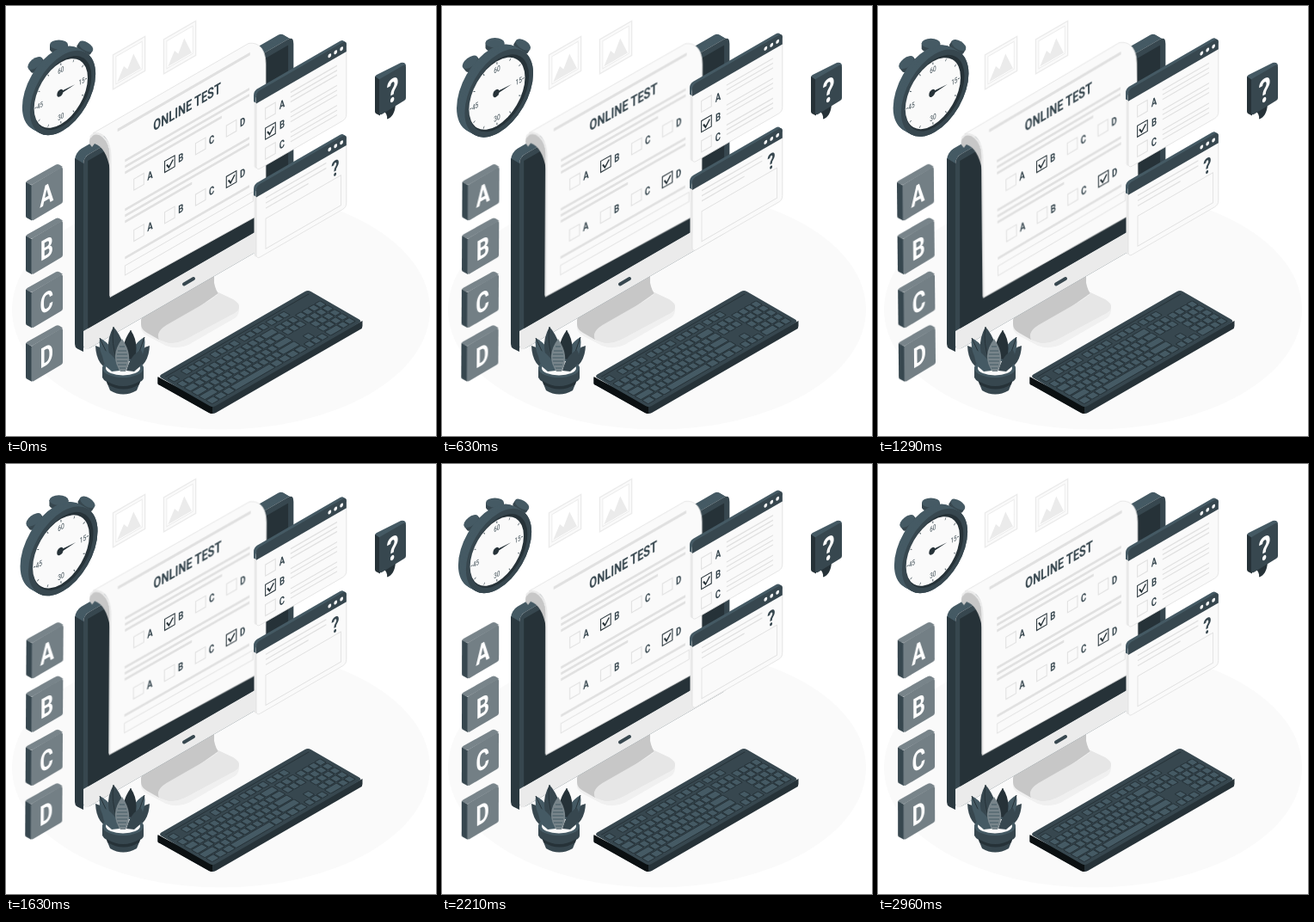
Recreate the animation shown at these times as an HTML page. Size 500x500 px, loop 3 s.

```html
<!DOCTYPE html>
<html lang="en">
<head>
<meta charset="utf-8">
<title>Online test</title>
<style>
html, body { margin: 0; width: 100%; height: 100%; overflow: hidden; background: #fff; }
svg { display: block; width: 100vw; height: 100vh; }
text { font-family: Roboto, Inter, "Liberation Sans", sans-serif; font-weight: 500; text-anchor: middle; fill: #37474f; }
.bold { font-weight: 700; }
.wind { animation: wind 1.5s linear infinite; }
#paper { transform-origin: 199.5px 190px; }
#blocks { transform-origin: 44.5px 310.5px; }
#watch { transform-origin: 61px 95px; animation: beat 3s linear infinite; }
.float { animation: float 1.5s linear infinite; }
@keyframes wind { 25% { transform: rotate(1deg); } 75% { transform: rotate(-1deg); } }
@keyframes float { 50% { transform: translateY(-10px); } }
@keyframes beat {
  0%, 30%, 40%, 60%, 100% { transform: scale(1); }
  10%, 50% { transform: scale(1.1); }
}
</style>
</head>
<body>
<svg viewBox="0 0 500 500">
  <defs>
    <g id="knob">
      <path d="M-5 4V14H5V4Z" fill="#263238"/>
      <path d="M-10.5 0V6C-8 12 8 12 10.5 6V0Z" fill="#37474f"/>
      <ellipse rx="10.5" ry="5.5" fill="#455a64"/>
    </g>
  </defs>
  <ellipse cx="250" cy="353" rx="243" ry="139.5" fill="#fafafa"/>
  <g id="pictures"></g>

  <g id="stand">
    <path d="M157 365V375Q158 380 165 384L186 395Q199 400 212 394L266 363Q272 359 271 349L240 335Z" fill="#f0f0f0"/>
    <path d="M157 366Q157 361 163 358L242 313V322Q244 331 247 334L190 374L178 388L164 380Q157 376 157 370Z" fill="#c7c7c7"/>
    <path d="M178 388Q173 378 190 369L232 345Q245 338 247 333L264 341Q272 346 271 350Q271 354 266 357L210 387Q196 394 186 391Z" fill="#e6e6e6"/>
  </g>
  <g id="monitor"></g>
  <path d="M207 323.500L218 317" stroke="#37474f" stroke-width="4" stroke-linecap="round"/>

  <g id="paper" class="wind">
    <path d="M97 160C96 144 116 140 121 172V190C118 173 112 163 103 160L100 164Z" fill="#c7c7c7"/>
    <path d="M121 338.500V172C121 155 113 146 101 148L282 43.500C294 41.500 302 50.500 302 67.500V238.500Z" fill="#fafafa" stroke="#e0e0e0" stroke-width=".8"/>
    <path d="M98 153C101 147 108 147 113 152Q121 159 121.500 174V337" fill="none" stroke="#ebebeb" stroke-width="2.200"/>
    <g id="sheet"></g>
  </g>
  <g id="windows" class="float"></g>

  <g id="plant">
    <path d="M124 424Q105 420 104 395Q118 399 129 418Z" fill="#37474f"/>
    <path d="M148 424Q166 418 167 395Q152 399 143 418Z" fill="#37474f"/>
    <path d="M126 424Q106 408 109 386Q125 394 132 418Z" fill="#455a64"/>
    <path d="M145 424Q164 408 161 385Q146 393 140 418Z" fill="#455a64"/>
    <path d="M129 424Q111 398 125 373Q140 390 139 418Z" fill="#37474f"/>
    <path d="M137 420Q132 394 145 377Q158 396 145 423Z" fill="#263238"/>
    <path d="M125 373Q122 392 129 412M145 377Q147 398 142 414M109 386Q116 402 125 418M161 385Q156 402 148 417" fill="none" stroke="#263238"/>
    <path d="M112 420V432Q114 436 117 437L121 447Q136 456 152 447L156 437Q160 435 160 432V420Z" fill="#37474f"/>
    <path d="M117 436Q136 448 156 436L155 440Q137 451 118 440Z" fill="#263238"/>
    <ellipse cx="136" cy="421" rx="24" ry="11" fill="#455a64"/>
    <ellipse cx="136" cy="421" rx="20" ry="8.500" fill="#fafafa"/>
    <path d="M116 419Q110 408 114 400Q128 406 132 424L123 425Z" fill="#455a64"/>
    <path d="M156 419Q162 408 157 400Q145 405 140 424L149 425Z" fill="#37474f"/>
    <path d="M133 425Q120 407 135 387Q149 407 139 425Z" fill="#78858b"/>
    <path d="M130 401H140M129 405H141M128.500 409H141.500M129 413H141M130 417H140M132 421H139M132 396H138" stroke="#455a64"/>
  </g>
  <g id="keyboard"></g>
  <g id="bubble">
    <path d="M439 122Q444 126 443 131.500Q452 129 453 114Z" fill="#263238"/>
    <path d="M429 83Q429 81 431 80L459 66Q465 65 465 70L435 87V127L430 124Q429 123 429 121Z" fill="#455a64"/>
    <path d="M429 82L435 86V127.500L430 125Q429 124 429 122Z" fill="#263238"/>
    <path d="M434 87Q434 85 436 84L462 69Q465 68 465 71V107Q465 109 463 110L437 126Q434 127 434 124Z" fill="#37474f"/>
  </g>
  <g id="watch"></g>
  <g id="blocks" class="wind"></g>
</svg>
<script>
const put = (id, s) => document.getElementById(id).insertAdjacentHTML('beforeend', s);
const iso = (x, y, s) => `<g transform="matrix(.866 -.5 0 1 ${x} ${y})">${s}</g>`;
const rect = (x, y, w, h, attrs) => `<rect x="${x}" y="${y}" width="${w}" height="${h}" ${attrs}/>`;
const line = (x1, x2, y, w) => `<path d="M${x1} ${y}H${x2}" stroke="#e0e0e0" stroke-width="${w}"/>`;
// Condensed label, centred on x and y.
const label = (s, x, y, size, attrs = 'class="bold"') =>
  `<text transform="translate(${x} ${y + size * .355}) scale(.86 1)" font-size="${size}" ${attrs}>${s}</text>`;
const box = (x, y, on) =>
  rect(x - 6.7, y - 6.5, 13.4, 13, `fill="none" stroke="${on ? '#263238' : '#e0e0e0'}" stroke-width="1.2"`) +
  (on ? `<path d="M${x - 4} ${y - 1}L${x - 1} ${y + 3.5}L${x + 4.5} ${y - 3}" fill="none" stroke="#263238" stroke-width="1.9"/>` : '');
// Stack copies from back to front to give a shape depth.
const extrude = (x, y, depth, s) => {
  let out = '';
  for (let d = depth; d >= 0; d--) out += iso(x - d, y - d * .577, s);
  return out;
};

for (const [x, y] of [[124, 97.5], [183, 79.5]]) {
  put('pictures', iso(x, y,
    rect(.5, -40.5, 43, 40, 'fill="#fafafa" stroke="#ebebeb" stroke-width="1.5"') +
    rect(4.5, -36.5, 35, 32, 'fill="#fff" stroke="#ebebeb"') +
    '<path d="M6 -6L15 -20L20 -14L28 -28L38 -6Z" fill="#ebebeb"/>'));
}

put('monitor',
  extrude(90, 402, 10, rect(0, -226, 282, 226, 'rx="9" fill="#455a64"')) +
  '<path d="M80 177L90 183V402L83 398.500Q80 397 80 392Z" fill="#2b3940"/>' +
  iso(90, 402,
    rect(0, -226, 282, 226, 'rx="7" fill="#ebebeb"') +
    '<path d="M0 -24V-218Q0 -226 8 -226H274Q282 -226 282 -218V-24Z" fill="#37474f"/>' +
    rect(6, -219, 269, 195, 'fill="#263238"')));

const answers = (y, checked) => [...'ABCD'].map((c, i) => {
  const x = 38.7 + i * 41.4;
  return box(x, y, c === checked) + label(c, x + 15, y, 12.8);
}).join('');
put('sheet', iso(121, 337,
  line(10, 188, -187.5, 3.5) +
  label('ONLINE TEST', 103.5, -168.2, 17.2) +
  line(20, 187, -147, 3) + line(20, 187, -140, 3) + line(20, 150, -133, 3) +
  answers(-113.3, 'B') +
  line(20, 187, -90, 3) + line(20, 187, -83, 3) + line(20, 110, -76, 3) +
  answers(-54, 'D') +
  line(20, 187, -34, 3) +
  rect(20, -25, 172, 11, 'fill="none" stroke="#e0e0e0"')));

const header = fill => `<path d="M0 13V5Q0 0 5 0H116Q121 0 121 5V13Z" fill="${fill}"/>`;
const panel = (y, h, inner) =>
  iso(288.5, y - 1, rect(0, 3, 121, h - 3, 'rx="5" fill="#ebebeb"')) +
  extrude(291, y, 3, header('#455a64')) +
  iso(291, y,
    rect(0, 3, 121, h - 3, 'rx="5" fill="#fafafa" stroke="#e0e0e0" stroke-width=".8"') +
    header('#37474f') +
    [98.5, 106.5, 114.5].map(x => `<circle cx="${x}" cy="6.5" r="2.2" fill="#fafafa"/>`).join('') + inner);
const options = [...'ABC'].map((c, i) => {
  const y = 31 + i * 23.2;
  return box(19, y, c === 'B') + label(c, 34.6, y, 12.8) +
    [-8, -2.5, 3].map(d => line(46, 108.5, y + d, 1.3)).join('');
}).join('');
put('windows',
  panel(100.5, 91, options) +
  panel(209.5, 85,
    line(12.7, 94, 20, 1.4) + line(12.7, 94, 26, 1.4) + line(12.7, 70, 32, 1.4) +
    label('?', 106, 32, 25) +
    rect(12.7, 44, 101, 35, 'fill="none" stroke="#e0e0e0"')));

const ones = n => Array(n).fill(1);
// Key widths per row; negative values are gaps.
const rows = [
  [1, -1, ...ones(4), -.5, ...ones(4), -.5, ...ones(4), -.25, 1, 1, 1],
  [...ones(13), 2, -.25, 1, 1, 1, -.25, ...ones(4)],
  [1.5, ...ones(12), 1.5, -.25, 1, 1, 1, -.25, ...ones(4)],
  [1.75, ...ones(11), 2.25, -3.5, ...ones(4)],
  [2.25, ...ones(10), 2.75, -1.25, 1, -1.25, ...ones(4)],
  [1.25, 1.25, 1.25, 6.25, ...Array(4).fill(1.25), -.25, 1, 1, 1, -.25, 2, 1, 1]
];
const unit = 8.6;
const keys = rows.map((row, r) => {
  let x = 3.5;
  const y = r ? 11.2 + r * 9.8 : 9;
  return row.map(w => {
    const key = w > 0 ? rect(x + .5, y, w * unit - 1.2, 8.2, 'rx="1"') : '';
    x += Math.abs(w) * unit;
    return key;
  }).join('');
}).join('');
put('keyboard',
  '<path d="M176.5 432V438Q176 440 179 441L236 473Q240 475 244 473L412 376Q414.5 375 414.5 372V366L240 462Z" fill="#263238"/>' +
  '<path d="M176.5 431V438Q176 440 179 441L236 473Q238 474 240 474V466Z" fill="#0b1012"/>' +
  '<g transform="matrix(.866 -.5 .866 .5 177 430.5)">' +
  rect(0, 0, 201, 73, 'rx="4" fill="#37474f"') +
  '<path d="M4 5.5H197" stroke="#263238"/>' +
  `<g fill="#455a64" stroke="#263238">${keys}</g></g>`);

put('bubble', iso(449.5, 98, label('?', 0, 0, 38, 'class="bold" style="fill:#fff"')));

const disc = (r, fill) => `<circle r="${r}" fill="${fill}"/>`;
const ticks = Array.from({ length: 12 }, (_, i) =>
  `<path d="M0 -35V-32.5" transform="rotate(${i * 30})" stroke="#37474f" stroke-width=".8"/>`).join('');
const marks = [['60', 0, -27], ['15', 28, 0], ['30', 0, 27], ['45', -28, 0]]
  .map(([s, x, y]) => label(s, x, y, 8.5, 'style="font-weight:400"')).join('');
put('watch',
  '<use href="#knob" transform="translate(33.8 66.5) rotate(-38) scale(.95)"/>' +
  '<use href="#knob" transform="translate(93 47) rotate(32) scale(.88)"/>' +
  '<use href="#knob" x="61.5" y="45"/>' +
  extrude(66, 101, 9, disc(44, '#455a64')) +
  iso(66, 101, disc(44, '#37474f') + disc(38.5, '#263238')) +
  iso(63.8, 101.5, disc(36, '#fafafa') + ticks + marks) +
  iso(62.8, 101.2, '<path d="M0 -1.5L20 0L0 1.5Z" fill="#263238"/>' + disc(4, '#263238')));

[...'ABCD'].forEach((c, i) => {
  put('blocks', `<g transform="translate(0 ${i * 62.4})">
    <path d="M23 206Q23 204 25 203L58 184.5Q60 183.5 62 184.5L66 187L30 208Z" fill="#78848a"/>
    <path d="M23 205L30 208.5V249.5L24.5 246.5Q23 246 23 244Z" fill="#37474f"/>
    <path d="M29.5 210Q29.5 208 31.5 207L63.5 188Q66 187 66 189.5V227Q66 229 64 230L32 249Q29.5 250 29.5 247.5Z" fill="#737f85"/>
    ${iso(47.3, 219, label(c, 0, 0, 32, 'class="bold" style="fill:#fff"'))}
  </g>`);
});
</script>
</body>
</html>
```
